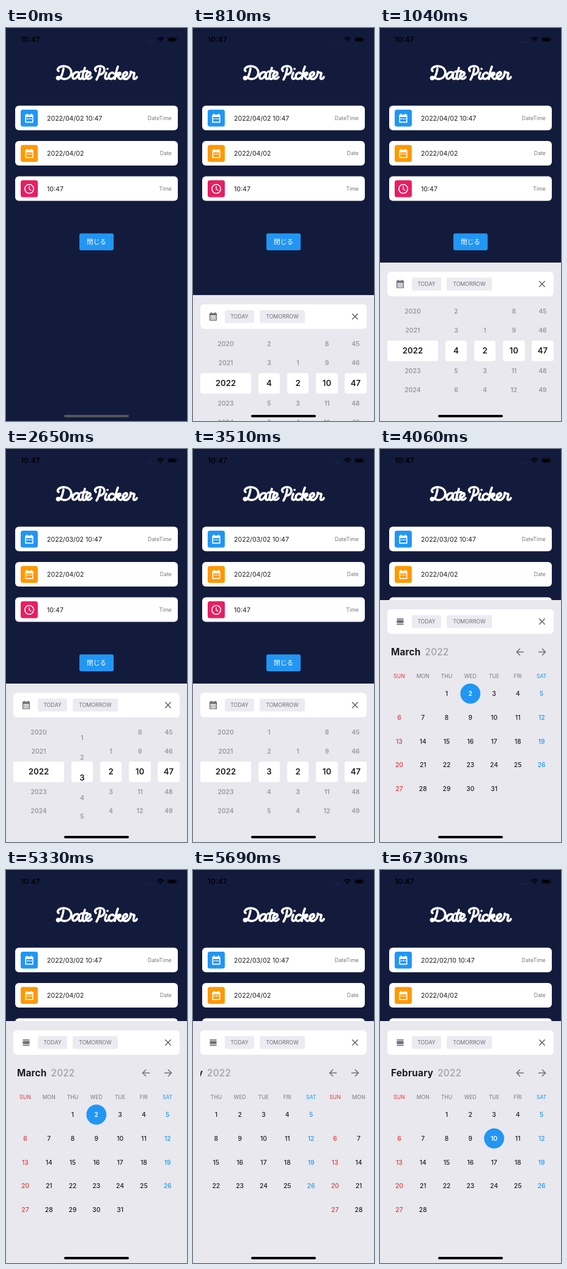
These frames come from a looping animation (296x640 px, 8000 ms). An HTML page:

```html
<!DOCTYPE html>
<html lang="ja">
<head>
<meta charset="utf-8">
<title>Date Picker</title>
<style>
  html, body { margin: 0; width: 100%; height: 100%; overflow: hidden; background: #131b3d; }
  svg { display: block; width: 296px; height: 640px; font-family: Inter, "Noto Sans CJK JP", "Noto Sans CJK", sans-serif; }
</style>
</head>
<body>
<svg id="stage" viewBox="0 0 296 640"></svg>
<script>
const LOOP = 8000, BLUE = '#2196f3', RED = '#e53935', GRAY = '#6f6f74', INK = '#1d1d20';
// The screen refreshes only at these moments.
const TICKS = [0, 700, 810, 920, 1040, 2020, 2130, 2230, 2340, 2650, 2800, 2910, 3020, 3130, 3240,
  3840, 3950, 4060, 5470, 5580, 5690, 6510, 6620, 6730];

const progress = (t, start, length) => Math.min(1, Math.max(0, (t - start) / length));
const smooth = p => p * p * (3 - 2 * p);
const easeOut = p => 1 - (1 - p) ** 3;

const rect = (x, y, w, h, r, fill) =>
  `<rect x="${x}" y="${y}" width="${w}" height="${h}" rx="${r}" fill="${fill}"/>`;
const circle = (x, y, r, fill) => `<circle cx="${x}" cy="${y}" r="${r}" fill="${fill}"/>`;
const line = (d, color, width, extra = '') =>
  `<path d="${d}" fill="none" stroke="${color}" stroke-width="${width}" ${extra}/>`;
const group = (x, y, content, extra = '') => `<g transform="translate(${x} ${y})" ${extra}>${content}</g>`;
// y is the middle of the capitals
const text = (x, y, value, size, fill, weight = 400, anchor = 'middle') =>
  `<text x="${x}" y="${y + size * 0.36}" font-size="${size}" fill="${fill}" font-weight="${weight}" text-anchor="${anchor}">${value}</text>`;

const calendarIcon = (color, rows) =>
  line('M-5.8-5.2H5.8V6.4H-5.8Z', color, 1.6, 'stroke-linejoin="round"') +
  rect(-6, -5.8, 12, 3.8, 1, color) + rect(-4.4, -7.6, 1.7, 3, 0, color) + rect(2.7, -7.6, 1.7, 3, 0, color) +
  rows.map(y => [-4, -0.9, 2.2].map(x => rect(x, y, 1.8, 1.8, 0, color)).join('')).join('');
const clockIcon = circle(0, 0, 7.2, 'none" stroke="#fff" stroke-width="1.6') + line('M0-4.2V.4L3.3 2.4', '#fff', 1.4);
const listIcon = rect(-6, -5.6, 12, 1.8, 0, GRAY) + rect(-6, -2.6, 12, 5.4, 0.6, GRAY) + rect(-6, 4, 12, 1.8, 0, GRAY);

const LETTERING = [
  'M94 66C93 72 92 78 88 82C85 85 82 82 84 80C87 78 91 84 97 83C106 82 109 73 105 67C101 61 91 61 86 65C84 67 84 69 86 70',
  'M120 73C116 70 110 73 109 78C108 83 112 84 115 81C118 78 119 75 120 73C119 77 118 83 121 83C123 83 125 81 126 79',
  'M129 65C127 71 125 77 125 80C125 84 129 84 131 81M123 71L133 70',
  'M131 80C135 79 139 76 138 73C137 70 131 73 131 78C131 84 137 84 140 80',
  'M154 66C153 73 151 79 148 84M147 70C143 66 148 62 154 62C163 62 164 74 153 76',
  'M164 73C162 77 161 83 164 83C166 83 167 82 168 80M166 66.5h.1',
  'M176 74C174 71 168 74 168 79C168 84 174 84 177 80',
  'M183 63C180 70 179 76 178 83M178 79C181 74 187 71 187 74C187 77 183 78 181 78C184 78 184 83 187 83C189 83 190 82 191 80',
  'M191 80C195 79 199 76 198 73C197 70 191 73 191 78C191 84 197 85 201 80',
  'M201 80C204 77 204 73 204 71C206 74 210 72 210 74C209 78 207 83 210 83C212 83 213 82 214 80'
].join('');

const statusBar = text(24, 19, '10:47', 12, '#000', 600, 'start') +
  [231, 234, 237, 240].map(x => circle(x, 23, 0.7, '#2c3350')).join('') +
  line('M247 17.6Q252.500 12.800 258 17.600M249.200 19.900Q252.500 17 255.800 19.900', '#000', 1.7) +
  '<path d="M250.700 21.300Q252.500 19.900 254.300 21.300L252.500 23.400Z"/>' +
  line('M264.500 15.100H278.500V22.400H264.500Z', '#0008', 0.8, 'stroke-linejoin="round"') +
  rect(265.6, 16.2, 11.8, 5.1, 1, '#000') + rect(279.6, 17.4, 1.2, 2.8, 0.6, '#0008');

const card = (y, color, icon, value, label) =>
  rect(15, y, 266, 40, 6, '#fff') + rect(24, y + 6.5, 28, 27.5, 3.5, color) + group(38, y + 20.5, icon) +
  text(67, y + 20.3, value, 10.6, INK, 400, 'start') + text(271, y + 20.3, label, 8.8, '#78787c', 400, 'end');

const home = dateTime => rect(0, 0, 296, 640, 0, '#131b3d') + statusBar +
  line(LETTERING, '#fff', 3.7, 'stroke-linecap="round" stroke-linejoin="round" role="img" aria-label="Date Picker"') +
  card(126.5, BLUE, calendarIcon('#fff', [0]), dateTime, 'DateTime') +
  card(184, '#ff9800', calendarIcon('#fff', [0]), '2022/04/02', 'Date') +
  card(241.5, '#e91e63', clockIcon, '10:47', 'Time') +
  rect(120, 334.5, 56, 27.5, 3, BLUE) + text(148, 348.3, '閉じる', 10.7, '#fff', 500);

function header(open) {
  const turn = 110 * (open < 0.5 ? open : open - 1);
  const icon = open < 0.5 ? calendarIcon(GRAY, [-0.4, 2.5]) : listIcon;
  return rect(12, 15, 272, 40, 6, '#fff') +
    group(33, 35, `<g transform="rotate(${turn}) scale(.92)">${icon}</g>`) +
    rect(52, 24.5, 48, 21, 3, '#ecebf2') + text(76, 35, 'TODAY', 8.8, GRAY) +
    rect(109, 24.5, 74, 21, 3, '#ecebf2') + text(146, 35, 'TOMORROW', 8.8, GRAY) +
    line('M260.300 30.300L269.700 39.700M269.700 30.300L260.300 39.700', '#5c5c60', 1.4);
}

// Values sit on a drum, seen from the front.
function wheel(x, width, position, low, high) {
  const current = Math.round(position);
  let out = rect(x, -16.5, width, 33.5, 4, '#fff');
  for (let v = Math.max(low, current - 3); v <= Math.min(high, current + 3); v++) {
    const offset = v - position, chosen = v === current;
    if (Math.abs(offset) < 2.5)
      out += text(x + width / 2, 135 * Math.sin(offset * 0.246), v, chosen ? 13.2 : 10.3, chosen ? INK : '#98989d', 600);
  }
  return out;
}
const wheels = month => wheel(12, 83, 2022, 1900, 2100) + wheel(107, 35, month, 1, 12) +
  wheel(154, 35, 2, 1, 31) + wheel(201, 36, 10, 0, 23) + wheel(248, 36, 47, 0, 59);

const columnX = c => 31.4 + 38.8 * c;
const dayColor = (c, plain) => c === 0 ? RED : c === 6 ? BLUE : plain;

function monthDays(days, selected, strength) {
  let out = ['SUN', 'MON', 'THU', 'WED', 'TUE', 'FRI', 'SAT']
    .map((name, c) => text(columnX(c), 124, name, 8.7, dayColor(c, '#77777c'))).join('');
  for (let d = 1; d <= days; d++) {
    const c = (d + 1) % 7, x = columnX(c), y = 152.3 + 38.75 * Math.floor((d + 1) / 7);
    out += text(x, y, d, 10.3, dayColor(c, INK), 500);
    if (d === selected)
      out += `<g opacity="${strength}">${circle(x, y, 16.4, BLUE)}${text(x, y, d, 10.3, '#fff', 600)}</g>`;
  }
  return out;
}
const monthTitle = name =>
  `<text x="18" y="90" font-size="15.3" letter-spacing=".2" font-weight="700" fill="${INK}">${name}` +
  '<tspan dx="7" font-weight="500" fill="#a0a0a5">2022</tspan></text>';

function calendar(page, picked) {
  const march = 272 * page, february = march - 272;
  return `<g clip-path="url(#titleArea)">${group(february, 0, monthTitle('February'))}${group(march, 0, monthTitle('March'))}</g>` +
    `<g clip-path="url(#pageArea)">${group(february, 0, monthDays(28, 10, picked))}${group(march, 0, monthDays(31, 2, 1))}</g>` +
    line('M235 84.500H223.500M229 79L223.500 84.500L229 90M259 84.500H270.500M265 79L270.500 84.500L265 90', GRAY, 1.5);
}

function scene(t) {
  const rise = easeOut(progress(t, 650, 390));
  const open = smooth(progress(t, 3718, 300));
  const month = 4 - 1.38 * smooth(progress(t, 1960, 380)) + 0.38 * easeOut(progress(t, 2600, 640));
  const page = smooth(progress(t, 5440, 376));
  const picked = progress(t, 6450, 250);
  const date = picked > 0 ? '02/10' : month < 3.5 ? '03/02' : '04/02';
  const top = 640 - 258 * rise - 136 * open, fade = open ** 1.5;
  let out = '<clipPath id="titleArea"><rect x="12" y="60" width="200" height="50"/></clipPath>' +
    '<clipPath id="pageArea"><rect x="12" y="110" width="272" height="290"/></clipPath>' + home(`2022/${date} 10:47`);
  if (rise > 0) {
    let sheet = rect(0, 0, 296, 400, 0, '#e9e8ef') + header(open);
    if (fade < 1) sheet += group(0, 143.5 + 68 * open, wheels(month), `opacity="${1 - fade}"`);
    if (fade > 0) sheet += `<g opacity="${fade}">${calendar(page, picked)}</g>`;
    out += group(0, top, sheet);
  }
  return out + rect(95, 630, 106, 4, 2, rise > 0 ? '#000' : '#55565c');
}

const stage = document.getElementById('stage');
let shown = -1;
function draw() {
  const now = performance.now() % LOOP;
  const tick = TICKS.filter(t => t <= now).pop();
  if (tick !== shown) stage.innerHTML = scene(shown = tick);
  requestAnimationFrame(draw);
}
draw();
</script>
</body>
</html>
```
